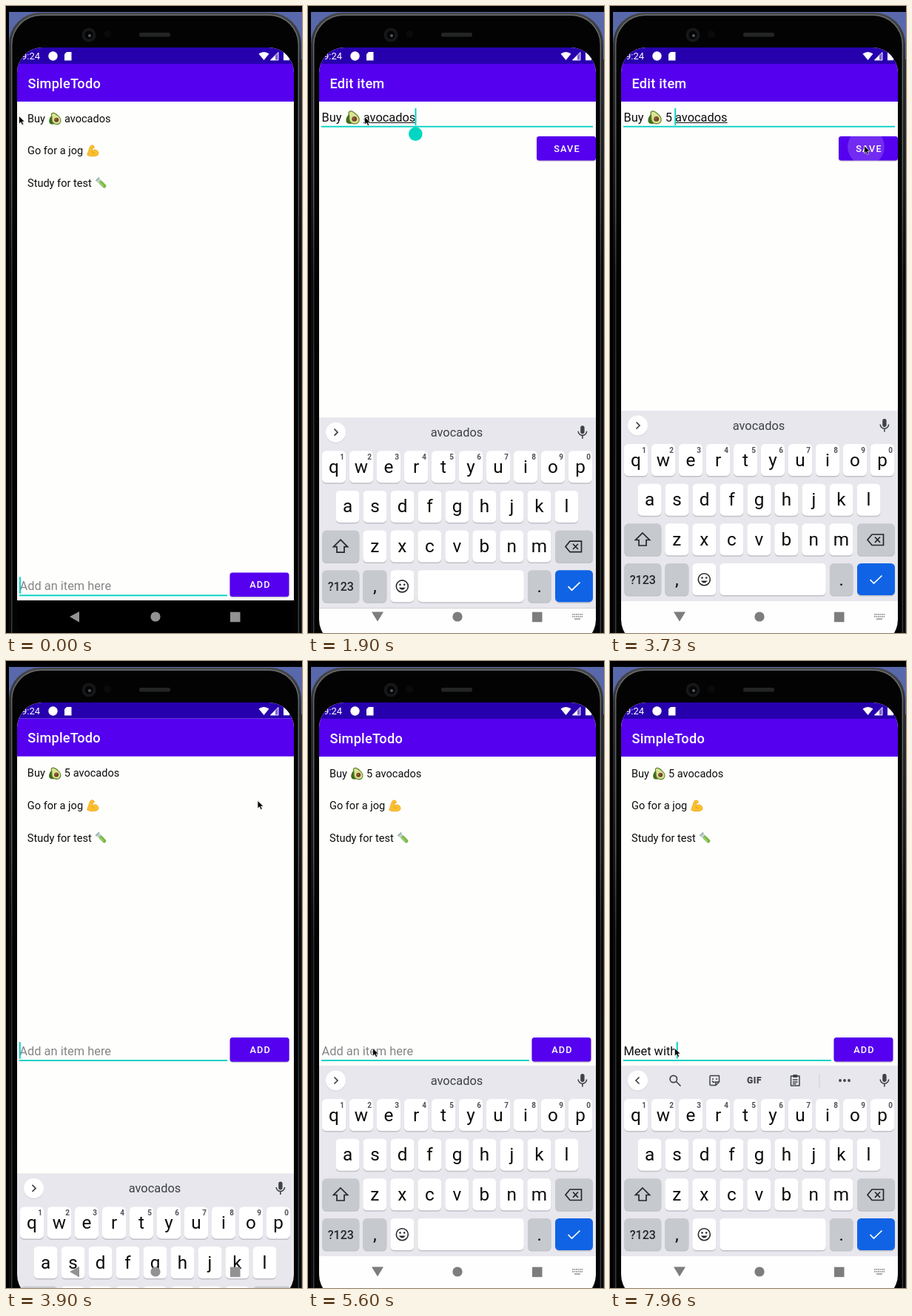
Recreate the animation shown at these times as an HTML page with a canvas. Size 400 by 846 pixels, loop 8000 ms.

```html
<!DOCTYPE html>
<html lang="en">
<head>
<meta charset="utf-8">
<title>Todo app demo</title>
<style>
html, body { margin: 0; width: 100%; height: 100%; overflow: hidden; background: #000; }
canvas { display: block; width: 400px; height: 846px; }
</style>
</head>
<body>
<canvas id="stage"></canvas>
<script>
const LOOP = 8000;
const PURPLE = '#5500ee', DARK_PURPLE = '#2700ae', TEAL = '#00d0c2', WHITE = '#fefefd', INK = '#0c0c0d', ICON = '#3f4246';
const canvas = document.getElementById('stage');
const dpr = window.devicePixelRatio || 1;
canvas.width = 400 * dpr;
canvas.height = 846 * dpr;
const c = canvas.getContext('2d');

const clamp = v => Math.max(0, Math.min(1, v));
const ramp = (t, from, to) => clamp((t - from) / (to - from));
const smooth = v => v * v * (3 - 2 * v);

// ---- drawing helpers
function rect(x, y, w, h, color) { c.fillStyle = color; c.fillRect(x, y, w, h); }
function box(x, y, w, h, r, color) {
  c.beginPath(); c.roundRect(x, y, w, h, r);
  c.fillStyle = color; c.fill();
}
function disc(x, y, r, color) {
  c.beginPath(); c.arc(x, y, r, 0, 7);
  c.fillStyle = color; c.fill();
}
function shape(d, color, line, width = 1) {
  const p = new Path2D(d);
  if (color) { c.fillStyle = color; c.fill(p); }
  if (line) { c.strokeStyle = line; c.lineWidth = width; c.stroke(p); }
}
function verticalGradient(stops) {
  const g = c.createLinearGradient(0, 0, 0, 846);
  for (const [offset, color] of stops) g.addColorStop(offset, color);
  return g;
}
function at(x, y, draw, scale = 1) {
  c.save(); c.translate(x, y); c.scale(scale, scale); draw(); c.restore();
}
function setFont(size, weight = 400, spacing = 0) {
  c.font = `${weight} ${size}px Roboto, sans-serif`;
  c.letterSpacing = spacing + 'px';
}
function text(s, x, y, size, color = INK, { weight = 400, align = 'left', spacing = 0 } = {}) {
  setFont(size, weight, spacing);
  c.textAlign = align;
  c.fillStyle = color;
  c.fillText(s, x, y);
  return c.measureText(s).width;
}

// ---- emoji, each on a 20 x 20 grid
const emoji = {
  avocado() {
    shape('M5 5C1 9 -1 15 2 18C5 20 10 19 12 17Z', '#3f6b1c');
    shape('M6 1.500C9 .5 12 3 15 6C19 9 20.500 14 17.500 17.500C14 20.500 8 19 6 15.500C4 12 6 9 4.500 5.500C4 3.500 4.500 2 6 1.500Z',
      '#dbe394', '#5b8428', 1.3);
    disc(12.3, 12.3, 3.6, '#74452a');
    disc(11.5, 11.4, 1.3, '#a06a48');
  },
  muscle() {
    shape('M2 13C4 9 4 4 7 1.5C10 .5 13 2 12 5L9.500 6L9 10C12 7 17 8 18.500 12C20 16 17 18 13 18.300C8 19 3 18.500 1 16.500Z',
      '#fbc02d', '#eaa41c', .9);
    shape('M8 11C9 13 11 14 13 13.500M9 6L7.500 5', null, '#d98f13', .9);
  },
  tube() {
    c.save(); c.translate(10, 10); c.rotate(-Math.PI / 4);
    box(-3.2, -9.5, 6.4, 19, 3, '#c3d3cb');
    box(-2.7, -4, 5.4, 13, 2.6, '#79b83c');
    rect(-1.8, -3, 1.4, 9, '#a8d976');
    box(-4, -10, 8, 2.4, 1, '#9db4ae');
    c.restore();
  }
};

// Draws strings and emoji in one line; returns the x position after it.
function richLine(parts, x, y, size) {
  for (const part of parts) {
    if (emoji[part]) {
      at(x + size * .08, y - size * .92, emoji[part], size * 1.17 / 20);
      x += size * 1.29;
    } else x += text(part, x, y, size);
  }
  return x;
}

function button(label, x, y) {
  box(x, y + 1, 80, 33, 4, 'rgba(0,0,0,.18)');
  box(x, y, 80, 32.6, 3.5, PURPLE);
  text(label, x + 41, y + 21, 12.7, '#fff', { weight: 500, align: 'center', spacing: 1.15 });
}

// ---- timeline state
const typedAt = [6500, 6630, 6760, 6900, 7200, 7330, 7630, 7760, 7860];
const typedText = t => 'Meet with'.slice(0, typedAt.filter(k => t >= k).length);

function listCaretOn(t) {
  if (t < 3000) return Math.floor((t - 110) / 250) % 2 !== 0;
  return t >= 6360 || Math.floor((t - 5330) / 255) % 2 === 0;
}

function keyboardOffset(t) {
  if (t < 1800) return 300;
  if (t < 3790) return 300 * Math.exp((1800 - t) / 29);
  if (t < 3880) return 300 * smooth(ramp(t, 3790, 3870));
  return t > 4100 ? 0 : 300 * Math.exp((3880 - t) / 29);
}

const pointerPath = [
  [30, 17, 148], [730, 121, 153], [1500, 121, 153], [1900, 76, 149], [3400, 76, 149], [3690, 343, 188],
  [3800, 343, 188], [3960, 338, 188], [4230, 338, 186], [4290, 334, 164], [4500, 110, 562], [4600, 87, 522]
];
function pointerAt(t) {
  const next = pointerPath.findIndex(p => p[0] > t);
  if (next === 0) return pointerPath[0].slice(1);
  if (next < 0) return pointerPath.at(-1).slice(1);
  const [a, b] = [pointerPath[next - 1], pointerPath[next]];
  const k = smooth(ramp(t, a[0], b[0]));
  return [a[1] + (b[1] - a[1]) * k, a[2] + (b[2] - a[2]) * k];
}

// ---- app windows
function appWindow(title) {
  rect(15, 56, 374, 746, WHITE);
  rect(15, 56, 374, 22, DARK_PURPLE);
  rect(15, 78, 374, 51, PURPLE);
  rect(15, 802, 374, 44, '#000');
  text(title, 29.5, 110.5, 18.2, '#fff', { weight: 500, spacing: .22 });
}

function listWindow(t) {
  appWindow('SimpleTodo');
  richLine(['Buy ', 'avocado', t > 3500 ? ' 5 avocados' : ' avocados'], 29, 156.7, 14.56);
  richLine(['Go for a jog ', 'muscle'], 29, 200.3, 14.56);
  richLine(['Study for test ', 'tube'], 29, 244, 14.56);
  const y = t > 3880 ? 508 : 764.4;
  const typed = typedText(t);
  const width = text(typed || 'Add an item here', 18.5, y + 23.7, 16.4, typed ? INK : '#858585');
  rect(18, y + 30, 281, 1.9, TEAL);
  if (listCaretOn(t)) rect(18 + (typed ? width : 0), y + 6, 1.9, 22.5, TEAL);
  button('ADD', 302.5, y);
}

function editWindow(t) {
  appWindow('Edit item');
  const focused = t >= 1780;
  const inserted = t < 2860 ? '' : t < 3100 ? '5' : '5 ';
  const insertX = richLine(['Buy ', 'avocado', ' '], 18.5, 155.7, 16.4);
  const wordX = insertX + text(inserted, insertX, 155.7, 16.4);
  const endX = wordX + text('avocados', wordX, 155.7, 16.4);
  rect(18, focused ? 161.8 : 162, 367, focused ? 1.8 : 1, focused ? TEAL : '#757575');
  button('SAVE', 309, 175.8);

  const ripple = ramp(t, 3660, 3760);
  if (ripple > 0) {
    c.save();
    c.beginPath(); c.roundRect(309, 175.8, 80, 32.6, 3.5); c.clip();
    disc(346, 190, 10 + 21 * ripple, 'rgba(255,255,255,.17)');
    c.restore();
  }
  if (!focused) return;
  const underlineX = inserted === '5' ? insertX : wordX;
  rect(underlineX, 157, endX - underlineX, 1, INK);
  const caretX = t < 2260 ? endX : wordX;
  if (t < 2630 || t >= 2860) rect(caretX - .8, 138, 1.9, 23, TEAL);
  if (t < 2860) {
    disc(caretX, 172.6, 9.3, '#00d6c2');
    shape(`M${caretX} 162.500l6 5h-12Z`, '#00d6c2');
  }
}

function scaled(scale, alpha, draw) {
  c.save();
  c.globalAlpha = alpha;
  c.translate(202, 451); c.scale(scale, scale); c.translate(-202, -451);
  draw();
  c.restore();
}

function windows(t) {
  const list = () => listWindow(t), edit = () => editWindow(t);
  if (t < 1290 || t > 3930) list();
  else if (t < 1550) {
    const e = 1 - Math.exp((1270 - t) / 29.5);
    scaled(1 + .05 * e, 1, list);
    scaled(.85 + .15 * e, ramp(t, 1285, 1320), edit);
  } else if (t < 3790) edit();
  else {
    const e = 1 - Math.exp((3790 - t) / 28);
    scaled(1.05 - .05 * e, 1, list);
    const alpha = 1 - ramp(t, 3800, 3850);
    if (alpha > 0) scaled(1 - .1 * e, alpha, edit);
  }
}

function statusIcons() {
  text('9:24', 21, 72.3, 13, '#fff');
  disc(63.5, 67.5, 6.2, '#fff');
  shape('M82 62H88.500V73.500H79V65Z', '#fff');
  shape('M341.500 64.500Q348.500 59.500 355.500 64.500L348.500 73Z', '#fff');
  shape('M368 62.500V73H357.500Z', 'rgba(255,255,255,.4)', '#fff', .9);
  shape('M364 66.500V73H357.500Z', '#fff');
  rect(375, 62.5, 8, 10.8, '#fff');
}

// ---- keyboard
function key(x, y, w, label, color = '#fff', size = 24.3, weight = 400) {
  box(x, y + 1, w, 43.5, 5.5, '#bfc1c7');
  box(x, y, w, 43, 5.5, color);
  if (label) text(label, x + w / 2, y + 29.5, size, INK, { align: 'center', weight });
}

function toolbarIcons() {
  c.save();
  c.lineCap = c.lineJoin = 'round';
  shape('M90.500 564a4.700 4.700 0 1 1-9.400 0a4.700 4.700 0 1 1 9.400 0M89.500 567.500L95 573', null, ICON, 1.7);
  shape('M136 559.500H147.500V568L143 572.500H136Q135 572.500 135 571V561Q135 559.500 136 559.500ZM147.500 568H143V572.500M138.500 567Q140 569.500 142 568', null, ICON, 1.5);
  disc(139, 564, 1, ICON); disc(144, 564, 1, ICON);
  text('GIF', 195, 570.3, 12, ICON, { weight: 900, align: 'center', spacing: .6 });
  shape('M244.500 560H256V573H244.500ZM247.500 565H253M247.500 568H253M247.500 570.500H251', null, ICON, 1.5);
  box(247, 558, 6.5, 4, 1.5, ICON);
  rect(282.5, 557, 1, 19, '#cfd1d6');
  for (const x of [311, 317, 323]) disc(x, 566, 1.9, ICON);
  c.restore();
}

function keyboard(t) {
  rect(15, 546, 374, 257, '#e7e7ed');
  rect(15, 803, 374, 343, '#fefefe');
  const toolbar = (t >= 2900 && t < 3130) || t >= 6520;
  disc(37.5, 567, 13.6, '#d2d3d8');
  disc(37.5, 566, 13.5, '#fff');
  shape(toolbar ? 'M39.500 561.500L35 566L39.500 570.500' : 'M35.500 561.500L40 566L35.500 570.500', null, ICON, 1.7);
  if (toolbar) toolbarIcons();
  else text('avocados', 201, 572, 16.4, '#3c4043', { align: 'center' });
  box(368.2, 557, 5.4, 11, 2.7, ICON);
  shape('M365.200 564.500a5.700 5.700 0 0 0 11.400 0M370.900 570.500V574.500', null, ICON, 1.6);

  [...'qwertyuiop'].forEach((ch, i) => {
    const x = 19 + 37 * i;
    key(x, 591, 32, ch);
    text(String((i + 1) % 10), x + 27, 602.7, 10, '#505358', { weight: 700, align: 'center' });
  });
  [...'asdfghjkl'].forEach((ch, i) => key(37.5 + 37 * i, 644.7, 32, ch));
  [...'zxcvbnm'].forEach((ch, i) => key(74.3 + 37 * i, 698.3, 32, ch));

  const gray = '#c6c9cd';
  key(19.3, 698.3, 50, '', gray);
  shape('M44 711L53.500 720.500H49V728H39V720.500H34.500Z', null, '#25272a', 1.7);
  key(334, 698.3, 51, '', gray);
  shape('M354 713H369.500V727.500H354L348 720.200ZM358 716.500L365 723.800M365 716.500L358 723.800', null, '#25272a', 1.7);

  key(19.3, 752, 50, '', gray);
  text('?123', 44.3, 779.5, 16, '#25272a', { weight: 500, align: 'center' });
  key(74.3, 752, 32, ',', gray);
  key(111.3, 752, 32, '');
  c.beginPath(); c.arc(127.3, 773.7, 8, 0, 7);
  c.strokeStyle = '#25272a'; c.lineWidth = 1.6; c.stroke();
  disc(124.5, 771.5, 1.3, '#25272a'); disc(130.2, 771.5, 1.3, '#25272a');
  shape('M122.800 775.500H131.800Q127.300 781.500 122.800 775.500Z', '#25272a');
  key(148.3, 752, 143.5, '');
  key(297, 752, 31.5, '.', gray);
  key(334, 752, 51, '', '#1063e5');
  shape('M351.500 774L356.500 779L367.500 768.500', null, '#fff', 1.7);
}

function navIcons(withKeyboard) {
  const color = withKeyboard ? '#7d7d7d' : '#929292';
  shape(withKeyboard ? 'M86 817.500H102L94 830.500Z' : 'M86 824L99 817V831.500Z', color);
  disc(202, 824, 6.6, color);
  rect(303, 817.7, 13.5, 13.5, color);
  if (!withKeyboard) return;
  for (let i = 0; i < 6; i++) for (const y of [820, 823]) rect(357 + i * 2.5, y, 1.7, 1.8, '#999');
  rect(360, 826.3, 8, 1.6, '#999');
}

function toast(t) {
  const alpha = ramp(t, 3900, 4020) * (1 - ramp(t, 4860, 5080));
  if (!alpha) return;
  c.save();
  c.globalAlpha = alpha;
  box(103.5, 737.5, 196, 44, 22, 'rgba(236,236,237,.96)');
  text('Item successfully updated!', 202, 763.2, 12.74, '#1c1c1c', { align: 'center' });
  c.restore();
}

function phone() {
  rect(0, 0, 400, 846, '#000');
  rect(4, 8, 396, 64, '#5868ab');
  rect(397.5, 72, 2.5, 774, '#2b2d36');
  box(4, 9, 395, 900, 42, verticalGradient([[0, '#4a4b4d'], [.08, '#2b2c2d'], [.42, '#0a0a0a'], [1, '#0a0a0a']]));
  box(7, 11.5, 389, 900, 40, verticalGradient([[0, '#6b6c6e'], [.3, '#5a5b5d'], [.45, '#2c2d2e'], [1, '#3c3d3f']]));
  box(8.4, 13, 386.2, 900, 39, '#030303');
  disc(112, 39, 9.5, '#161719');
  disc(112, 39, 5.5, '#050507');
  disc(113, 40, 2, '#55595f');
  disc(137, 38, 5, '#0a0a0b');
  box(180, 36, 42, 5.5, 2, '#232425');
}

function render(t) {
  c.setTransform(dpr, 0, 0, dpr, 0, 0);
  phone();
  c.save();
  c.beginPath(); c.roundRect(15, 56, 374, 806, 34); c.clip();
  windows(t);
  statusIcons();
  const offset = keyboardOffset(t);
  const open = offset < 299;
  if (open) at(0, offset, () => keyboard(t));
  navIcons(open && offset < 30);
  toast(t);
  c.restore();
  const [x, y] = pointerAt(t);
  at(x, y, () => shape('M.500 .500V11L3 8.700L4.800 12.500L6.700 11.600L5 8H8.300Z', '#080808', 'rgba(255,255,255,.75)', .8));
}

const start = performance.now();
function tick() {
  render((performance.now() - start) % LOOP);
  requestAnimationFrame(tick);
}
tick();
</script>
</body>
</html>
```
